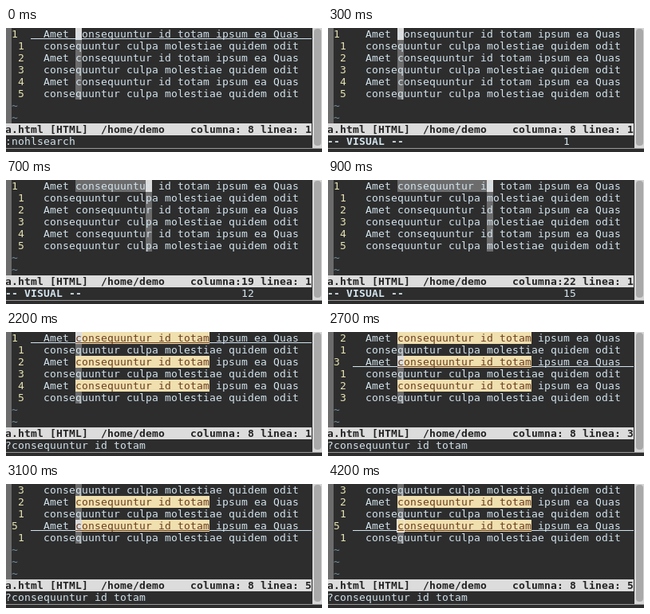
An HTML page for the animation above (4300 ms loop, 396 by 156 pixels).

```html
<!DOCTYPE html>
<html lang="es">
<head>
<meta charset="utf-8">
<title>Visual search</title>
<style>
  html, body { margin: 0; width: 100%; height: 100%; overflow: hidden; background: #2d2d2d; }
  #stage { position: relative; width: 396px; height: 156px; overflow: hidden; background: #2d2d2d; }
  #stage > div { position: absolute; }
  #screen { inset: 0; font: 13px/15px "DejaVu Sans Mono", monospace; color: #d3e4ee; }
  #screen span { position: absolute; height: 15px; white-space: pre; }
  #gutter { left: 0; top: 0; width: 7px; height: 120px; background: #6c6c6c; }
  #statusbar { left: 0; top: 120px; width: 383px; height: 15px; background: #dcdcdc; }
  #scrollbar { left: 384px; top: 0; width: 12px; height: 151px; background: #d6d6d6; }
  #thumb { left: 386px; top: 1px; width: 9px; height: 147px; border-radius: 4px; background: #a9a9a9; }
  #edge { left: 0; top: 151px; width: 396px; height: 1px; background: #999; }

  #screen .number { color: #e6e2b4; }
  #screen .tilde { color: #6f92a6; }
  #screen .status { color: #222; font-weight: bold; }
  #screen .mode { font-weight: bold; }
  #screen .column, #screen .selected { background-color: #6c6c6c; }
  #screen .match { background-color: #f0dfaf; color: #6b3d1e; }
  #screen .line { background-image: linear-gradient(currentColor, currentColor);
                  background-repeat: no-repeat; background-position: 0 13px; background-size: 100% 1px; }
  #screen .cursor { background-color: #dcdcdc; }
  #screen .hollow { outline: 1px solid #e8e8e8; z-index: 1; }
</style>
</head>
<body>
<div id="stage">
  <div id="gutter"></div>
  <div id="statusbar"></div>
  <div id="scrollbar"></div>
  <div id="thumb"></div>
  <div id="edge"></div>
  <div id="screen"></div>
</div>
<script>
const LOOP = 4300, CELL = 8, ROW = 15, ROWS = 8, COLUMNS = 44;
const TEXT_LEFT = 31, START = 8, MATCH_END = 28;
const ODD = '  Amet consequuntur id totam ipsum ea Quas';
const EVEN = '  consequuntur culpa molestiae quidem odit';
const BUFFER = [ODD, EVEN, ODD, EVEN, ODD, EVEN];

const normal = (at, line, message, more) =>
  ({ at, line, message, top: 1, column: START, ...more });
const visual = (at, column) =>
  normal(at, 1, '-- VISUAL --', { column, visual: true });
const search = (at, line, more) =>
  normal(at, line, '?consequuntur id totam', { search: true, ...more });

const steps = [
  normal(0, 1, ':nohlsearch'),
  visual(300, 8),
  visual(700, 19),
  visual(900, 22),
  visual(1200, 28),
  search(2200, 1),
  search(2700, 3),
  search(3100, 5, { top: 2 }),
  search(4200, 5, { top: 2, hollow: true })
];

const screen = document.getElementById('screen');

function put(x, row, text, style = '') {
  const span = document.createElement('span');
  span.className = style;
  span.textContent = text;
  span.style.left = x + 'px';
  span.style.top = row * ROW + 'px';
  screen.append(span);
  return span;
}

// Keeps the glyph advance on whole terminal cells.
function alignToCells() {
  const probe = put(0, 0, 'm'.repeat(COLUMNS));
  const advance = probe.getBoundingClientRect().width / COLUMNS;
  screen.style.letterSpacing = CELL - advance + 'px';
}

function cellStyle(step, line, column) {
  const current = line === step.line;
  const styles = [];
  if (current && !step.visual) styles.push('line');
  if (step.search && line % 2 && column >= START && column <= MATCH_END) styles.push('match');
  else if (step.visual && current && column >= START && column <= step.column) styles.push('selected');
  else if (!current && column === step.column) styles.push('column');
  if (current && column === step.column) styles.push(step.hollow ? 'hollow' : 'cursor');
  return styles.join(' ');
}

// Groups neighbouring cells of one style into a single span.
function putLine(step, line, row) {
  const text = BUFFER[line - 1].padEnd(COLUMNS);
  let from = 1;
  for (let column = 1; column <= COLUMNS; column++) {
    const style = cellStyle(step, line, column);
    if (column < COLUMNS && cellStyle(step, line, column + 1) === style) continue;
    put(TEXT_LEFT + (from - 1) * CELL, row, text.slice(from - 1, column), style);
    from = column + 1;
  }
}

function render(step) {
  screen.replaceChildren();
  for (let row = 0; row < ROWS; row++) {
    const line = step.top + row;
    if (line > BUFFER.length) {
      put(7, row, '~', 'tilde');
      continue;
    }
    const distance = Math.abs(line - step.line);
    put(distance ? 15 : 7, row, String(distance || line), 'number');
    putLine(step, line, row);
  }
  const column = String(step.column).padStart(2);
  put(-1, 8, 'a.html [HTML]  /home/demo', 'status');
  put(231, 8, `columna:${column} linea: ${step.line}`, 'status');
  put(-1, 9, step.message, step.visual ? 'mode' : '');
  if (step.visual) put(295, 9, String(step.column - START + 1));
}

let shown;
function tick() {
  const time = performance.now() % LOOP;
  const step = steps.findLast(s => s.at <= time);
  if (step !== shown) render(shown = step);
  requestAnimationFrame(tick);
}
alignToCells();
tick();
</script>
</body>
</html>
```
